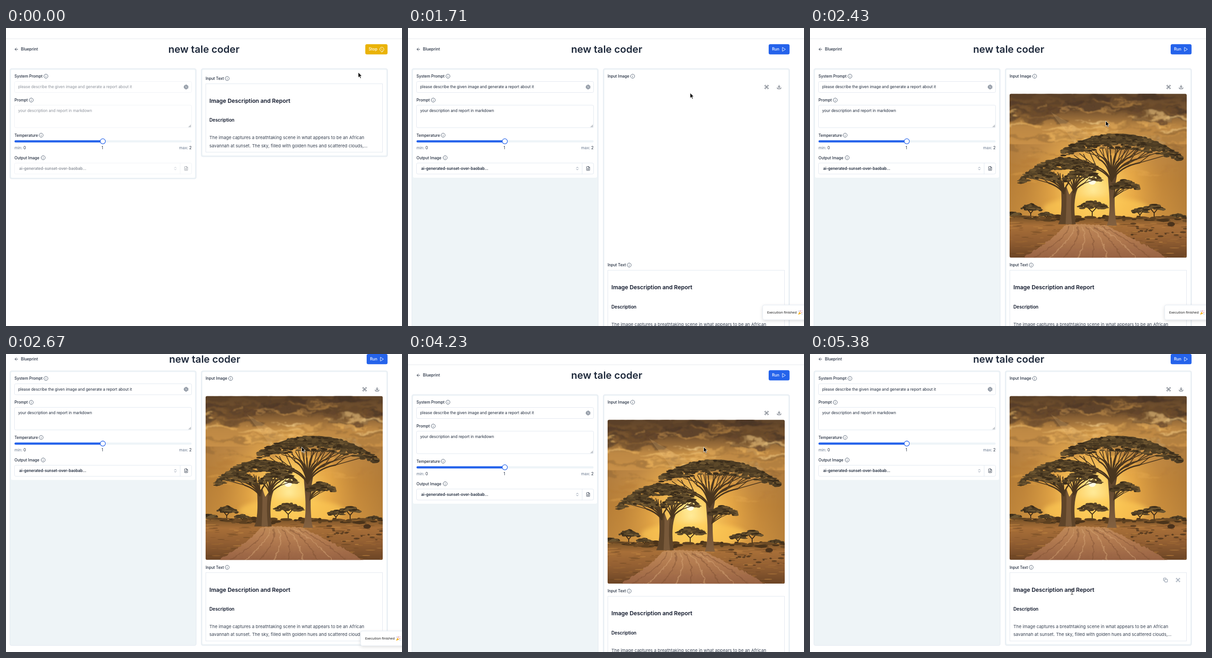
Write an HTML page that moves like this. It is 863 px wide and 649 px high and loops after 5.46 s.

```html
<!DOCTYPE html>
<html lang="en">
<head>
<meta charset="utf-8">
<style>
html, body { margin: 0; width: 100%; height: 100%; overflow: hidden; background: #fff; }
svg { display: block; font-family: Inter, "Noto Sans", sans-serif; }
text { white-space: pre; }
</style>
</head>
<body>
<svg id="stage" width="863" height="649" viewBox="0 0 863 649"></svg>
<script>
const LOOP = 5460;
const INK = '#1e293b', MUTED = '#64748b', LINE = '#e2e8f0', BLUE = '#2563eb';
const RING = 'M2 12a10 10 0 1 0 20 0a10 10 0 1 0-20 0';
const ICONS = {
  info: RING + 'M12 16v-4M12 8h.01',
  back: 'm12 19-7-7 7-7M19 12H5',
  stop: RING + 'm15 9-6 6M9 9l6 6',
  play: 'M6 3l14 9-14 9z',
  focus: 'M3 7V5a2 2 0 0 1 2-2h2M17 3h2a2 2 0 0 1 2 2v2M21 17v2a2 2 0 0 1-2 2h-2M7 21H5a2 2 0 0 1-2-2v-2M8 12a4 4 0 1 0 8 0a4 4 0 1 0-8 0M7 7l2 2M17 7l-2 2M7 17l2-2M17 17l-2-2',
  download: 'M21 15v4a2 2 0 0 1-2 2H5a2 2 0 0 1-2-2v-4M7 10l5 5 5-5M12 15V3',
  sort: 'm7 15 5 5 5-5M7 9l5-5 5 5',
  file: 'M15 2H6a2 2 0 0 0-2 2v16a2 2 0 0 0 2 2h12a2 2 0 0 0 2-2V7zM14 2v5h6M12 11v7M8.5 14.5h7',
  copy: 'M10 8h10a2 2 0 0 1 2 2v10a2 2 0 0 1-2 2H10a2 2 0 0 1-2-2V10a2 2 0 0 1 2-2M4 16a2 2 0 0 1-2-2V4a2 2 0 0 1 2-2h10a2 2 0 0 1 2 2',
  aperture: RING + 'M14.3 8l5.7 10M9.7 8h11.5M7.4 12l5.7-10M9.7 16 4 6M14.3 16H2.8M16.6 12l-5.7 10'
};

const text = (x, y, str, size = 8.4, fill = INK, attrs = '') =>
  `<text x="${x}" y="${y}" font-size="${size}" fill="${fill}" ${attrs}>${str}</text>`;
const rect = (x, y, w, h, fill, attrs = '') =>
  `<rect x="${x}" y="${y}" width="${w}" height="${h}" fill="${fill}" ${attrs}/>`;
const box = (x, y, w, h, r = 3) => rect(x, y, w, h, '#fff', `rx="${r}" stroke="${LINE}"`);
const ellipse = (x, y, rx, ry, fill, attrs = '') =>
  `<ellipse cx="${x.toFixed(1)}" cy="${y.toFixed(1)}" rx="${rx.toFixed(1)}" ry="${ry.toFixed(1)}" fill="${fill}" ${attrs}/>`;
const path = (d, fill, attrs = '') => `<path d="${d}" fill="${fill}" ${attrs}/>`;
const stroke = (d, color, width) => path(d, 'none', `stroke="${color}" stroke-width="${width}" stroke-linecap="round"`);
const icon = (name, x, y, color = INK, size = 10.4) => {
  const k = size / 24;
  return `<g transform="translate(${x - size / 2} ${y - size / 2}) scale(${k})">` +
    path(ICONS[name], 'none', `stroke="${color}" stroke-width="2" stroke-linecap="round" stroke-linejoin="round"`) + '</g>';
};
const label = (x, y, str, iconX) =>
  text(x, y + 3, str, 8.4, INK, 'font-weight="500"') + icon('info', iconX, y, '#475569', 10.6);
const group = (id, body, attrs = '') => `<g id="${id}" ${attrs}>${body}</g>`;
const filtered = (name, body) => `<g filter="url(#${name})">${body}</g>`;

let seed = 11;
const rand = (lo = 0, hi = 1) => {
  seed = (seed * 16807) % 2147483647;
  return lo + (hi - lo) * seed / 2147483647;
};
const pick = list => list[Math.floor(rand(0, list.length))];
const repeat = (n, make) => Array.from({ length: n }, (_, i) => make(i)).join('');

const LEAVES = ['#4a3a22', '#5c4829', '#6b5430', '#3a2c1a', '#4f3e25'];

// Flat-topped crown: a filled arch, ragged with small leaf clumps.
function crown(cx, top, rx, drop, depth, n, tilt = 0) {
  const edge = u => top + drop * u * u + tilt * u;
  const arch = `M${cx - rx} ${edge(-1)}Q${cx} ${top - drop} ${cx + rx} ${edge(1)}Q${cx} ${top - drop + depth * 1.3} ${cx - rx} ${edge(-1)}Z`;
  return path(arch, '#4d3c23') + repeat(n, () => {
    const u = rand(-1, 1), y = edge(u) + rand() * depth * (1 - .6 * u * u);
    return ellipse(cx + u * rx, y, rand(2.5, 8), rand(1, 2.8), pick(LEAVES));
  });
}

function branches(x, y, cx, spread, tipY, drop, n, width) {
  return repeat(n, i => {
    const u = (i + rand(.1, .9)) / n * 2 - 1, tx = cx + u * spread, ty = tipY + drop * u * u;
    const mx = x + (tx - x) * rand(.35, .6), my = y + (ty - y) * rand(.5, .85);
    return stroke(`M${x} ${y}Q${x + (mx - x) * .3} ${my + 8} ${mx} ${my}`, '#4a361f', width * 1.5) +
      stroke(`M${mx} ${my}L${tx} ${ty}M${mx} ${my}l${(tx - mx) * .4} ${(ty - my) * 1.1}`, '#4a361f', width * .8);
  });
}

function smallTree(x, base, height, half) {
  const fork = base - height * .45;
  return stroke(`M${x} ${base}V${fork}l${-half * .5} ${-height * .35}M${x} ${fork}l${half * .5} ${-height * .35}`, '#3d2b18', 2) +
    crown(x, base - height, half, height * .25, height * .35, Math.round(half * 2));
}

function clouds(n, x0, x1, y0, y1, colors, alpha, thick = 6) {
  return repeat(n, () => ellipse(rand(x0, x1), rand(y0, y1), rand(12, 44), rand(1.5, thick), pick(colors), `opacity="${alpha}"`));
}

function landscape() {
  const sky = rect(0, 0, 386, 290, 'url(#sky)') +
    rect(0, 0, 386, 290, 'url(#glow)') +
    rect(0, 110, 386, 170, 'url(#dusk)') +
    filtered('cloud',
      clouds(30, 0, 386, 44, 108, ['#f0c272', '#e9b25c', '#f6d08a'], .5, 5) +
      clouds(24, -10, 396, 60, 130, ['#8f6434', '#a3743b', '#b17f40'], .45, 4) +
      clouds(12, 230, 390, 60, 150, ['#8a6032', '#9c6e39'], .4) +
      clouds(14, 0, 386, 125, 185, ['#e5aa4d', '#b47a38'], .35, 4) +
      clouds(40, -10, 396, 0, 40, ['#493424', '#553c28', '#65472b'], .6, 8) +
      clouds(12, -10, 110, 30, 62, ['#553c28', '#6b4a2c'], .5) +
      clouds(12, 250, 396, 30, 66, ['#553c28', '#6b4a2c'], .5) +
      clouds(10, 60, 300, 14, 52, ['#d9a254', '#c28c47'], .45, 3)) +
    path('M90 40 180 92 136 100Z', '#f0c985', 'opacity=".18"') +
    filtered('soft', ellipse(188, 250, 115, 26, '#ffcb55', 'opacity=".6"') + ellipse(180, 191, 17, 14, '#ffe891')) +
    ellipse(180, 191, 8, 7, '#fffbe3');
  const ground = rect(0, 270, 386, 87, 'url(#grass)') +
    repeat(90, () => ellipse(rand(0, 386), rand(266, 277), rand(3, 14), rand(1, 3.5), pick(['#4a331a', '#5c4020', '#6d4b26']))) +
    repeat(240, () => ellipse(rand(0, 386), rand(280, 356), rand(3, 14), rand(.4, 1.5), pick(['#c78c45', '#774a25', '#9f6a33', '#63401f']), 'opacity=".5"')) +
    filtered('rough', path('M118 287Q150 281 212 287C240 302 305 332 345 359H28C70 330 110 306 118 287Z', 'url(#road)') +
      `<g opacity=".45">` + repeat(9, i =>
        stroke(`M${130 + i * 9} 290Q${126 + i * 16} 312 ${52 + i * 32} 359`, i % 2 ? '#d9aa7a' : '#7d4f32', 2.4)) + '</g>') +
    repeat(26, () => ellipse(rand(240, 384), rand(282, 318), rand(2, 7), rand(.8, 2.2), '#452f1a', 'opacity=".7"')) +
    ellipse(352, 284, 8, 5, '#4a321c');
  const far = smallTree(46, 277, 37, 21) + smallTree(10, 279, 22, 11) + smallTree(80, 277, 18, 14) +
    smallTree(284, 276, 27, 15) + smallTree(315, 275, 34, 20) + smallTree(366, 277, 15, 15) +
    smallTree(180, 277, 43, 29);
  const left = path('M106 284Q116 264 112 205L124 203 130 220 142 203 148 207Q137 235 144 284Z', '#5e4429') +
    path('M122 284Q124 248 124 204L130 220 135 214Q132 252 136 284Z', '#78593a') +
    branches(118, 217, 82, 54, 172, 14, 9, 2) + branches(140, 215, 154, 43, 170, 14, 9, 1.8) +
    crown(123, 139, 68, 20, 26, 190) + crown(66, 162, 43, 24, 24, 120) + crown(158, 163, 40, 20, 22, 100);
  const right = path('M212 287Q221 261 216 204L214 178 221 188 226 174 234 177Q228 206 229 242Q230 275 234 287Z', 'url(#bark)') +
    branches(222, 190, 240, 105, 118, 18, 16, 2.1) + branches(227, 226, 252, 27, 200, 6, 6, 1.4) +
    crown(245, 87, 129, 41, 34, 400, 6) + crown(251, 188, 30, 14, 18, 80);
  return sky + far + ground + left + right;
}

const gradient = (id, stops) => `<linearGradient id="${id}" x2="0" y2="1">` +
  stops.map(([at, color]) => `<stop offset="${at}" stop-color="${color}"/>`).join('') + '</linearGradient>';

const defs = '<defs>' +
  gradient('sky', [[0, '#5f442a'], [.14, '#7d5831'], [.25, '#bd8844'], [.42, '#cb9249'], [.65, '#d2923c'], [1, '#e0a044']]) +
  gradient('grass', [[0, '#7d5529'], [.2, '#a86f38'], [.55, '#935f32'], [1, '#6b4425']]) +
  gradient('road', [[0, '#c08a58'], [.4, '#b27a50'], [1, '#966142']]) +
  gradient('bark', [[0, '#59412a'], [1, '#836140']]) +
  `<radialGradient id="glow" gradientUnits="userSpaceOnUse" cx="182" cy="208" r="150">
    <stop offset="0" stop-color="#ffeb9a"/><stop offset=".25" stop-color="#ffd468" stop-opacity=".95"/>
    <stop offset=".6" stop-color="#f5b74c" stop-opacity=".55"/><stop offset="1" stop-color="#e8ae4b" stop-opacity="0"/></radialGradient>
  <linearGradient id="dusk"><stop offset="0" stop-color="#8d6030" stop-opacity=".4"/><stop offset=".3" stop-color="#8d6030" stop-opacity="0"/>
    <stop offset=".7" stop-color="#8d6030" stop-opacity="0"/><stop offset="1" stop-color="#8d6030" stop-opacity=".45"/></linearGradient>
  <filter id="soft" x="-30%" y="-30%" width="160%" height="160%"><feGaussianBlur stdDeviation="5"/></filter>
  <filter id="cloud"><feTurbulence type="fractalNoise" baseFrequency=".025 .06" numOctaves="4" seed="4"/>
    <feDisplacementMap in="SourceGraphic" scale="34" xChannelSelector="R" yChannelSelector="G"/><feGaussianBlur stdDeviation=".9"/></filter>
  <filter id="rough"><feTurbulence type="fractalNoise" baseFrequency=".12" numOctaves="2" seed="7"/>
    <feDisplacementMap in="SourceGraphic" scale="7" xChannelSelector="R" yChannelSelector="G"/><feGaussianBlur stdDeviation=".6"/></filter>
  <filter id="shadow" x="-20%" y="-40%" width="140%" height="200%"><feDropShadow dx="0" dy="2.5" stdDeviation="3.5" flood-opacity=".12"/></filter>
  <clipPath id="photoClip"><rect width="386" height="357" rx="3.5"/></clipPath>
  <clipPath id="revealClip"><rect id="reveal" width="386" height="0"/></clipPath></defs>`;

const panel = (id, x) => rect(x, 88.5, 406, 240, '#eef4f7', `id="${id}" rx="3.5" stroke="${LINE}"`);
const card = (id, x, h) => rect(x, 91, 401, h, '#fff', `id="${id}" rx="3"`);

const settings =
  panel('leftPanel', 8.5) + card('leftCard', 11, 235) +
  label(18.5, 105, 'System Prompt', 87) + label(18.5, 157, 'Prompt', 55) +
  label(18.5, 233.5, 'Temperature', 76.5) + label(18.5, 282.5, 'Output Image', 81) +
  `<g class="field">` + box(18.5, 116.5, 386, 24) + text(26.5, 131.3, 'please describe the given image and generate a report about it', 8.37) +
  box(18.5, 168, 386, 49) + text(26.5, 182.6, 'your description and report in markdown', 8.37) +
  box(18.5, 294, 386, 24) + stroke('M379.5 294v24', LINE, 1) +
  text(28.8, 309, 'ai-generated-sunset-over-baobab…', 8.3, INK, 'font-weight="600"') +
  icon('sort', 369, 306, '#64748b', 9.5) + icon('file', 392.5, 306, INK, 10) + '</g>' +
  icon('aperture', 392.5, 128.5, '#475569', 10.5) +
  path('M403 210v6h-6z', '#c3c7cc') +
  rect(18.5, 244.5, 386, 4.8, '#eef4f8', 'rx="2.4"') + rect(18.5, 244.5, 192.5, 4.8, BLUE, 'rx="2.4"') +
  `<circle cx="211" cy="246.8" r="5.6" fill="#fff" stroke="${BLUE}" stroke-width="1.3"/>` +
  text(18.5, 263.6, `min: <tspan fill="${INK}">0</tspan>`, 8.6, MUTED) +
  text(210, 263.6, '1', 8.6, INK, 'text-anchor="middle"') +
  text(404.5, 263.6, `max: <tspan fill="${INK}">2</tspan>`, 8.6, MUTED, 'text-anchor="end"');

const report = label(435, 159.3, 'Input Text', 482) +
  box(435.5, 170.7, 385, 149, 0) +
  text(443.3, 212.4, 'Image Description and Report', 12.3, '#0f172a', 'font-weight="600"') +
  text(443.3, 253.6, 'Description', 9.8, '#0f172a', 'font-weight="600"') +
  text(443.3, 291.7, 'The image captures a breathtaking scene in what appears to be an African', 9.58, '#374151') +
  text(443.3, 309.1, 'savannah at sunset. The sky, filled with golden hues and scattered clouds,…', 9.58, '#374151') +
  group('hoverIcons', icon('copy', 774.7, 187, MUTED) + icon('focus', 802, 187, MUTED));

const output = panel('rightPanel', 425.5) + card('rightCard', 428, 186) +
  group('imageHead', label(435, 105, 'Input Image', 489.5) + icon('focus', 781.5, 128.5) + icon('download', 808.7, 128.5)) +
  `<g transform="translate(435 143.2)" clip-path="url(#revealClip)"><g clip-path="url(#photoClip)">${landscape()}</g></g>` +
  group('report', report);

const button = (id, x, color, name, str) => group(id,
  rect(x, 35.3, 831.5 - x, 22.2, color, 'rx="3.5"') +
  text(x + 7.3, 49.4, str, 8.6, '#fff', 'font-weight="500"') + icon(name, 819, 46.4, '#fff', 10.8));

const header = icon('back', 22.6, 46.4, INK, 10.6) + text(32.6, 49.4, 'Blueprint', 8.6, INK, 'font-weight="500"') +
  text(433, 54.2, 'new tale coder', 21.8, INK, 'id="title" font-weight="600" text-anchor="middle"') +
  button('stop', 783, '#eab308', 'stop', 'Stop') + button('run', 786, BLUE, 'play', 'Run');

const party = path('M850 624.6l2.8-6.6 4 3.9z', '#f5b82e') + stroke('M854.5 618q1.8-1 1-2.6M856.5 620.5q1-1.8 2.6-1', '#d9534f', .9) +
  stroke('M851 616.3h.1M858.6 623h.1', '#4a90d9', 1.3) + stroke('M858.6 616h.1M853.5 616.2h.1', '#c45ab3', 1.3);
const toast = box(772.8, 603.2, 110, 32.3, 4).replace('/>', ' filter="url(#shadow)"/>') +
  text(782.8, 622.4, 'Execution finished', 7.5, '#171717', 'font-weight="500" style="font-family:\'Noto Sans\',sans-serif"') + party;

const pointer = group('arrow', path('M0 0V11.2L2.6 8.8 4.4 13 6.2 12.2 4.4 8.1H7.8Z', '#000', 'stroke="#fff" stroke-width=".8"')) +
  group('beam', path('M-2.6-6Q0-6 0-4.6Q0-6 2.6-6M0-4.8V4.8M-2.6 6Q0 6 0 4.6Q0 6 2.6 6', 'none', 'stroke="#222" stroke-width="1"'));

document.getElementById('stage').innerHTML = defs + rect(0, 0, 863, 649, '#fff') +
  group('page', stroke('M0 23.5H863', '#e5e9ee', 1) + settings + output) +
  group('header', header) + group('toast', toast) + group('pointer', pointer);

const $ = id => document.getElementById(id);
const fields = document.querySelector('.field');
const show = (id, on) => $(id).setAttribute('display', on ? 'inline' : 'none');
const move = (id, x, y) => $(id).setAttribute('transform', `translate(${x} ${y})`);
const set = (id, name, value) => $(id).setAttribute(name, value);

const stepped = (t, start, n, gap = 80) => Math.min(n, Math.max(0, Math.floor((t - start) / gap) + 1)) / n;

// start time, number of steps, destination
const MOVES = [[160, 6, 523.5, 159.5], [890, 3, 591.7, 164.5], [1550, 4, 622.7, 133.8], [2270, 3, 644.5, 202.5], [5220, 3, 571, 518]];

function pointerAt(t) {
  let x = 767.7, y = 96.7;
  for (const [start, n, toX, toY] of MOVES) {
    const p = stepped(t, start, n);
    x += (toX - x) * p;
    y += (toY - y) * p;
  }
  return [x, y];
}

function scrollAt(t) {
  if (t >= 4720 || (t >= 2670 && t < 3590)) return 51.7;
  return t >= 3590 && t < 3670 ? 6.7 : 0;
}

function render(t) {
  const done = t >= 160, sized = t >= 1710, scroll = scrollAt(t);
  const shift = sized ? 357 : done ? 0 : -49.3;

  move('page', 0, -scroll);
  move('header', 0, -Math.min(scroll, 35.2));
  set('title', 'x', done ? 433 : 431.3);
  show('stop', !done);
  show('run', done);
  fields.setAttribute('opacity', done ? 1 : .5);

  set('leftPanel', 'height', sized ? 598 : done ? 241 : 240);
  set('rightPanel', 'height', 241 + shift);
  set('rightCard', 'height', 235.5 + shift);
  show('imageHead', done);
  move('report', 0, shift);
  const loading = 1950 + Math.floor((t - 1950) / 80) * 80;
  set('reveal', 'height', t < 1950 ? 0 : Math.min(357, 357 * (loading - 1790) / 500));

  const enter = 1 - (1 - stepped(t, 160, 6)) ** 2, leave = stepped(t, 4080, 3, 75);
  move('toast', 0, 46 * (1 - enter) + 40 * leave);
  set('toast', 'opacity', enter * (1 - leave));

  const [x, y] = pointerAt(t), overReport = y > 476;
  move('pointer', x, y);
  show('arrow', !overReport);
  show('beam', overReport);
  show('hoverIcons', overReport);
}

const begin = performance.now();
function frame() {
  render((performance.now() - begin) % LOOP);
  requestAnimationFrame(frame);
}
render(0);
requestAnimationFrame(frame);
</script>
</body>
</html>
```
